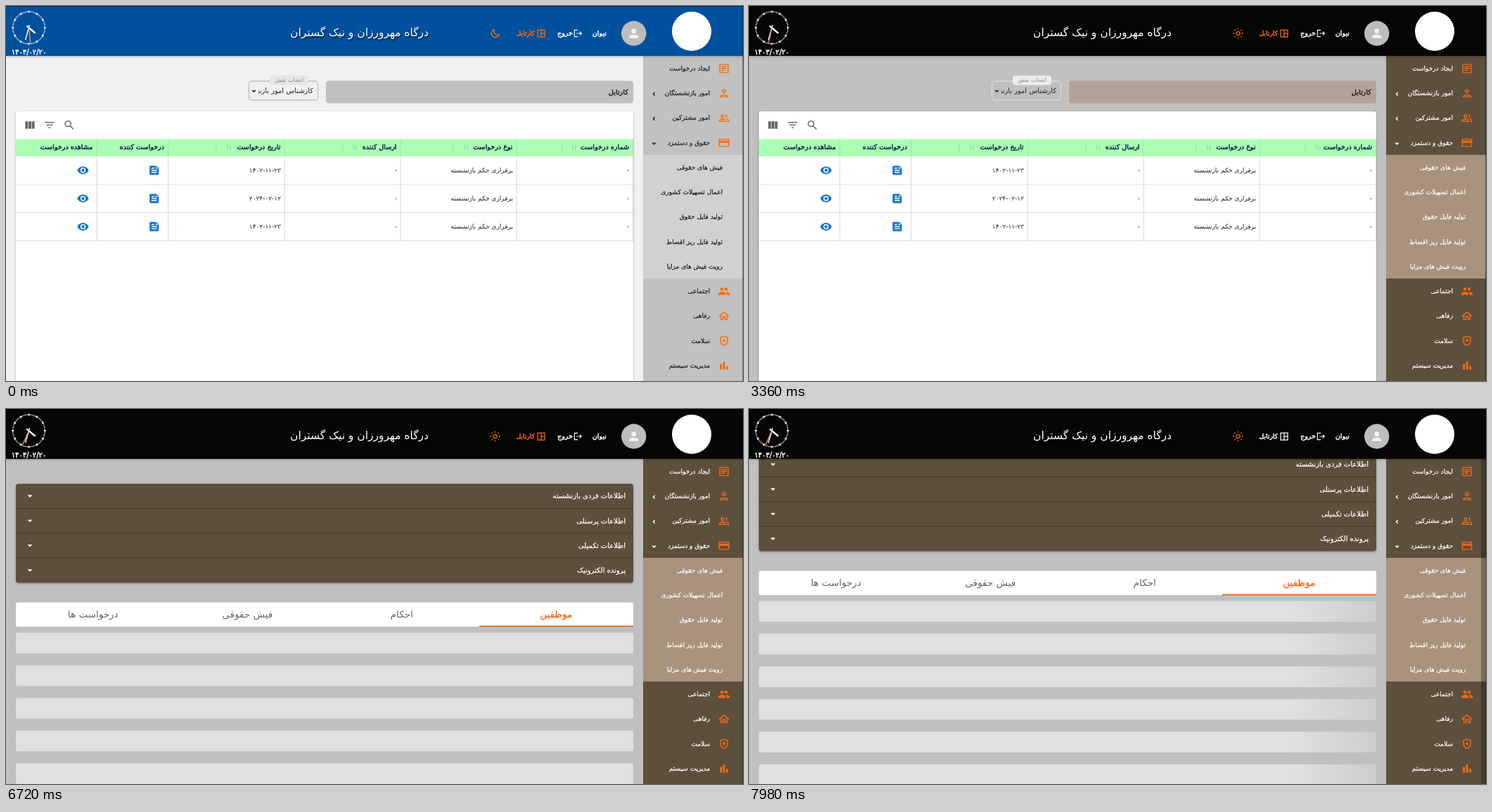
An HTML page that plays this animation: 1048 px wide and 534 px high, repeating every 8000 ms.

```html
<!DOCTYPE html>
<html lang="fa">
<head>
<meta charset="utf-8">
<style>
html, body { margin: 0; width: 100%; height: 100%; overflow: hidden; }
svg { display: block; width: 1048px; height: 534px; font-family: "DejaVu Sans", sans-serif; }
.b { stroke: currentColor; stroke-width: .5; }
.m { stroke: currentColor; stroke-width: .25; }
.o { fill: none; stroke: currentColor; stroke-width: 2; }
.w { fill: none; stroke: currentColor; stroke-width: 4; }
.f { fill: currentColor; }
</style>
</head>
<body>
<svg id="stage" viewBox="0 0 1048 534"></svg>
<script>
const LOOP = 8000;
const stage = document.getElementById('stage');

// Each colour: light theme, dark theme
const theme = {
  head: ['#00509d', '#060605'],
  page: ['#f1f1f1', '#c0c0c0'],
  side: ['#c1c1c1', '#5c4f3c'],
  sub: ['#d1d1d1', '#a8937c'],
  ink: ['#222222', '#ffffff'],
  bar: ['#c0c0c0', '#b3a499'],
  edge: ['#bdbdbd', '#dcdcdc'],
  chip: ['#e6e6e6', '#ececec'],
  accent: ['#ff6b00', '#f76a14']
};

const text = (x, y, s, size = 9, fill = '#222', cls = '', anchor = 'end') =>
  `<text x="${x}" y="${y + size * .33}" font-size="${size}" fill="${fill}" color="${fill}" class="${cls}" text-anchor="${anchor}">${s}</text>`;
const rect = (x, y, w, h, fill, more = '') =>
  `<rect x="${x}" y="${y}" width="${w}" height="${h}" fill="${fill}" ${more}/>`;
const circle = (x, y, r, fill, more = '') =>
  `<circle cx="${x}" cy="${y}" r="${r}" fill="${fill}" ${more}/>`;
const group = (id, body) => `<g id="${id}">${body}</g>`;

const icons = {
  article: ['o', 'M4 4h16v16H4zM7 8.5h10M7 12h10M7 15.5h7'],
  person: ['o', 'M12 5a3 3 0 1 0 .01 0zM5 19v-1c0-2 4.7-3 7-3s7 1 7 3v1z'],
  pair: ['o', 'M9 6a2.6 2.6 0 1 0 .01 0zM3 18v-1c0-2 4-3 6-3s6 1 6 3v1zM15 5.5a2.8 2.8 0 0 1 0 5.5M17 13.5c2 .6 4 1.6 4 3.5v2h-4'],
  card: ['o', 'M3 5h18v14H3zM3 9h18M3 11h18'],
  people: ['f', 'M16 11a3 3 0 1 0 0-6 3 3 0 0 0 0 6zm-8 0a3 3 0 1 0 0-6 3 3 0 0 0 0 6zm0 2c-2.3 0-7 1.2-7 3.5V19h14v-2.5c0-2.3-4.7-3.5-7-3.5zm8 0-1 .05c1.2.8 2 2 2 3.45V19h6v-2.5c0-2.3-4.7-3.5-7-3.5z'],
  home: ['o', 'M2.5 12.5 12 4l9.5 8.5M6 10v9h4v-6h4v6h4v-9'],
  shield: ['o', 'M12 3l7 2.6V11c0 4.5-3 8.6-7 10-4-1.4-7-5.5-7-10V5.6zM8.5 11.5h7M12 8v7'],
  chart: ['f', 'M4 9h4v11H4zM16 13h4v7h-4zM10 4h4v16h-4z'],
  eye: ['f', 'M12 4.5C7 4.5 2.7 7.6 1 12c1.7 4.4 6 7.5 11 7.5s9.3-3.1 11-7.5c-1.7-4.4-6-7.5-11-7.5zM12 17a5 5 0 1 1 0-10 5 5 0 0 1 0 10zm0-8a3 3 0 1 0 0 6 3 3 0 0 0 0-6z'],
  doc: ['f', 'M16 3H5a2 2 0 0 0-2 2v14a2 2 0 0 0 2 2h14a2 2 0 0 0 2-2V8zM7 7h5v2H7zm10 10H7v-2h10zm0-4H7v-2h10zm-2-4V5l4 4z'],
  search: ['o', 'M9.5 4a5.5 5.5 0 1 0 .01 0zM14 14l6 6'],
  filter: ['f', 'M10 18h4v-2h-4zM3 6v2h18V6zm3 7h12v-2H6z'],
  columns: ['f', 'M3 5h5.3v14H3zM9.3 5h5.4v14H9.3zM15.7 5H21v14h-5.3z'],
  moon: ['o', 'M10 4a8.5 8.5 0 1 0 10.5 11A8.5 8.5 0 0 1 10 4z'],
  sun: ['o', 'M12 8a4 4 0 1 0 .01 0zM12 1v3M12 20v3M1 12h3M20 12h3M4.2 4.2l2 2M17.8 17.8l2 2M4.2 19.8l2-2M17.8 6.2l2-2'],
  exit: ['o', 'M12 4H4v16h8M9 12h12M17 8l4 4-4 4'],
  board: ['o', 'M4 4h16v16H4zM12 4v16M12 12h8'],
  user: ['f', 'M12 12a4 4 0 1 0 0-8 4 4 0 0 0 0 8zm0 2c-2.7 0-8 1.3-8 4v2h16v-2c0-2.7-5.3-4-8-4z'],
  left: ['w', 'M15 6l-6 6 6 6'],
  down: ['w', 'M6 9l6 6 6-6'],
  caret: ['f', 'M6 9.5l6 6 6-6z'],
  dots: ['f', 'M10.5 4h3v3h-3zM10.5 10.5h3v3h-3zM10.5 17h3v3h-3z'],
  sort: ['o', 'M8 20V4l-4 4M16 4v16l4-4']
};
const icon = (name, x, y, color, size = 17.6) => {
  const [cls, d] = icons[name];
  return `<path class="${cls}" color="${color}" d="${d}" transform="translate(${x - size / 2} ${y - size / 2}) scale(${size / 24})"/>`;
};

function clock() {
  const hand = (id, len, width, color, angle) =>
    `<line id="${id}" y1="4" y2="${-len}" stroke="${color}" stroke-width="${width}" transform="rotate(${angle})"/>`;
  const ring = (n, width, dash) =>
    `<circle r="22.8" fill="none" stroke="#fff" stroke-width="${width}" pathLength="${n}" stroke-dasharray="${dash} ${1 - dash}" stroke-dashoffset="${dash / 2}"/>`;
  return `<g transform="translate(32.5 31)">${ring(60, 1.6, .5)}${ring(12, 2.8, .18)}` +
    hand('hour', 12, 2.4, '#fff', 130) + hand('minute', 18, 1.4, '#fff', 196) +
    hand('second', 23, 1.2, '#e9a878', 174) + '</g>' +
    text(32.5, 66, '۱۴۰۳/۰۲/۲۰', 10, '#fff', 'b', 'middle');
}

function header() {
  return rect(0, 0, 1048, 71, 'var(--head)', 'filter="url(#shade)"') + clock() +
    `<g style="filter:drop-shadow(1px 2px 1px #000a)">${text(502.5, 38, 'درگاه مهرورزان و نیک گستران', 15.5, '#fff', '', 'middle')}</g>` +
    circle(695.5, 39.5, 12, 'rgba(0,0,0,.06)', 'id="moonHover"') +
    group('moon', icon('moon', 695.5, 39, 'var(--accent)', 16)) +
    group('sun', icon('sun', 695.5, 39, 'var(--accent)', 16)) +
    `<g id="inbox">${text(752, 39, 'کارتابل', 9.2, 'currentColor', 'b')}${icon('board', 761, 39, 'inherit', 15)}</g>` +
    text(806, 39, 'خروج', 9.6, '#fff', 'b') + icon('exit', 813, 39, '#fff', 14) +
    text(854, 39, 'نیوان', 9.6, '#fff', 'b') +
    circle(892.7, 39, 17.7, '#bdbdbd') + icon('user', 892.7, 39, '#f3f3f3', 20) +
    circle(975, 36, 28, '#fff');
}

function sidebar() {
  const items = [
    ['ایجاد درخواست', 'article'], ['امور بازنشستگان', 'person', 'left'],
    ['امور مشترکین', 'pair', 'left'], ['حقوق و دستمزد', 'card', 'down'],
    ['فیش های حقوقی'], ['اعمال تسهیلات کشوری'], ['تولید فایل حقوق'],
    ['تولید فایل ریز اقساط'], ['رویت فیش های مزایا'],
    ['اجتماعی', 'people'], ['رفاهی', 'home'], ['سلامت', 'shield'], ['مدیریت سیستم', 'chart']
  ];
  return rect(906, 71, 142, 463, 'var(--side)') + rect(906, 212, 142, 176, 'var(--sub)') +
    items.map(([label, name, arrow], i) => {
      const y = 89 + i * 35.25;
      return text(name ? 1001 : 1019, y, label, 9, 'var(--ink)', 'm') +
        (name ? icon(name, 1021, y, 'var(--accent)') : '') +
        (arrow ? icon(arrow, 921.5, y + 1, 'var(--ink)', 9) : '');
    }).join('');
}

function inboxPage() {
  const edges = [892, 726.5, 561.5, 396.5, 231, 129.5, 14];
  const heads = [['شماره درخواست', 808, 791], ['نوع درخواست', 654, 636], ['ارسال کننده', 496, 479],
    ['تاریخ درخواست', 317, 299], ['درخواست کننده'], ['مشاهده درخواست']];
  const dates = ['۱۴۰۲-۱۱-۲۳', '۲۰۲۴-۰۲-۱۲', '۱۴۰۲-۱۱-۲۳'];
  const rows = dates.map((date, i) => {
    const y = 234 + i * 40.1;
    return rect(14, y - 20, 878, 40, '#ebebeb', `id="row${i}"`) +
      text(886, y, '-') + text(721, y, 'برقراری حکم بازنشسته') + text(556, y, '-') + text(391, y, date) +
      icon('doc', 210.7, y, '#1976d2') + icon('eye', 109.5, y, '#1976d2') +
      rect(14, y + 19.5, 878, 1, '#dedede');
  }).join('');
  return rect(455, 106.5, 437, 32, 'var(--bar)', 'rx="4"') + text(885, 122.5, 'کارتابل', 9.8, '#222', 'b') +
    rect(345.5, 107, 98, 27, 'none', 'rx="4" stroke="var(--edge)" stroke-width="1.3"') +
    rect(375, 99, 55, 13.5, 'var(--chip)', 'rx="4"') + text(423, 105.5, 'انتخاب نقش', 8, '#808080') +
    `<g clip-path="url(#field)">${text(437, 120.5, 'کارشناس امور بازنشستگان', 9.9)}</g>` +
    icon('down', 352.5, 121, '#222', 9) +
    rect(14, 150, 878, 400, '#fff', 'rx="4" filter="url(#shade)"') +
    icon('columns', 34, 169.5, '#666') + icon('filter', 62, 169.5, '#666') + icon('search', 90, 169.5, '#666') +
    rect(14, 189.5, 878, 24.5, '#abffb5') + rows +
    edges.slice(0, -1).map(x => rect(x - .9, 189.5, 1, 145, '#bcbcbc', 'opacity=".6"')).join('') +
    heads.map(([label, sort, dots], i) => text(edges[i] - 6, 201, label, 9.6, '#0d2b4c', 'b') +
      (sort ? icon('sort', sort, 201.5, '#8ccb95', 10) + icon('dots', dots, 201.5, '#8ccb95', 12) : '')).join('') +
    circle(211, 234, 14, '#1976d2', 'id="docHover"') + circle(211, 234, 14, '#1976d2', 'id="ripple"');
}

function detailPage() {
  const panels = ['اطلاعات فردی بازنشسته', 'اطلاعات پرسنلی', 'اطلاعات تکمیلی', 'پرونده الکترونیک'];
  const tabs = ['درخواست ها', 'فیش حقوقی', 'احکام', 'موظفین'];
  let out = rect(14, 106.5, 878, 141, '#5c4f3c', 'rx="4" filter="url(#shade)"');
  panels.forEach((label, i) => {
    const y = 124 + i * 35.25;
    out += text(881, y, label, 10, '#fff', 'm') + icon('caret', 34, y, '#fff', 14);
    if (i) out += rect(14, y - 18, 878, 1, '#463b2b');
  });
  out += rect(14, 275.5, 878, 34.5, '#fff', 'rx="3"') + rect(673, 308.5, 219, 1.8, '#f26413');
  tabs.forEach((label, i) => {
    const on = i === 3;
    out += text(123.75 + i * 219.5, 293, label, 13.5, on ? '#f26413' : '#666', on ? 'm' : '', 'middle');
  });
  for (let i = 0; i < 6; i++)
    for (const fill of ['#e0e0e0', 'url(#wave)'])
      out += rect(14, 318.5 + i * 46.5, 878, 29.5, fill, 'rx="3"');
  return out;
}

stage.innerHTML = `<defs>
  <filter id="shade" x="-5%" y="-10%" width="110%" height="130%" color-interpolation-filters="sRGB">
    <feDropShadow dx="0" dy="1" stdDeviation="1.5" flood-opacity=".3"/></filter>
  <clipPath id="field"><rect x="359" y="108" width="82" height="25"/></clipPath>
  <linearGradient id="wave" gradientUnits="userSpaceOnUse" x1="14" x2="892">
    <stop offset="0" stop-opacity="0"/><stop offset=".5" stop-opacity=".3"/><stop offset="1" stop-opacity="0"/>
  </linearGradient></defs>` +
  rect(0, 0, 1048, 534, 'var(--page)') + group('list', inboxPage()) + group('detail', detailPage()) +
  sidebar() + rect(1041, 0, 6, 534, 'rgba(0,0,0,.28)', 'id="thumb"') + header() +
  rect(0, 0, 1048, 1, 'rgba(0,0,0,.4)') + rect(1047, 0, 1, 534, 'rgba(0,0,0,.4)');

const $ = id => document.getElementById(id);
const show = (id, amount) => $(id).setAttribute('opacity', +amount);
const within = (t, a, b) => t >= a && t < b;
const part = (t, a, b) => Math.max(0, Math.min(1, (t - a) / (b - a)));
const ease = v => v * v * (3 - 2 * v);
const channels = hex => [1, 3, 5].map(i => parseInt(hex.slice(i, i + 2), 16));
const mix = ([a, b], k) => {
  const to = channels(b);
  return `rgb(${channels(a).map((v, i) => Math.round(v + (to[i] - v) * k))})`;
};

const ticks = [700, 1820, 2800, 3920, 5880];

function render(t) {
  const dark = ease(part(t, 2800, 2940));
  for (const name in theme) stage.style.setProperty('--' + name, mix(theme[name], dark));
  show('moonHover', within(t, 2520, 3150));
  show('moon', t < 2800);
  show('sun', t >= 2800);
  $('inbox').setAttribute('color', t < 7070 ? 'var(--accent)' : '#fff');

  const secs = 29 + ticks.filter(at => t >= at).length;
  $('second').setAttribute('transform', `rotate(${secs * 6})`);

  show('row0', within(t, 3780, 3990) || within(t, 4760, 6720));
  show('row1', within(t, 3990, 4760));
  show('row2', false);
  show('docHover', within(t, 5880, 6720) * .06);
  const press = part(t, 6230, 6580);
  $('ripple').setAttribute('r', 14 * ease(press));
  show('ripple', .25 * (1 - press));

  const loaded = t >= 6720;
  $('list').style.display = loaded ? 'none' : '';
  $('detail').style.display = loaded ? '' : 'none';
  const shift = t < 7070 ? -2 : t < 7210 ? -.25 + .25 * part(t, 7070, 7210) : .86 * part(t, 7210, 7860);
  $('wave').setAttribute('gradientTransform', `translate(${878 * shift} 0)`);
  const scroll = 45 * ease(part(t, 7350, 7840));
  $('detail').setAttribute('transform', `translate(0 ${-scroll})`);
  $('thumb').setAttribute('y', scroll);
  show('thumb', t >= 7140);
}

const start = performance.now();
function frame() {
  render((performance.now() - start) % LOOP);
  requestAnimationFrame(frame);
}
render(0);
requestAnimationFrame(frame);
</script>
</body>
</html>
```
